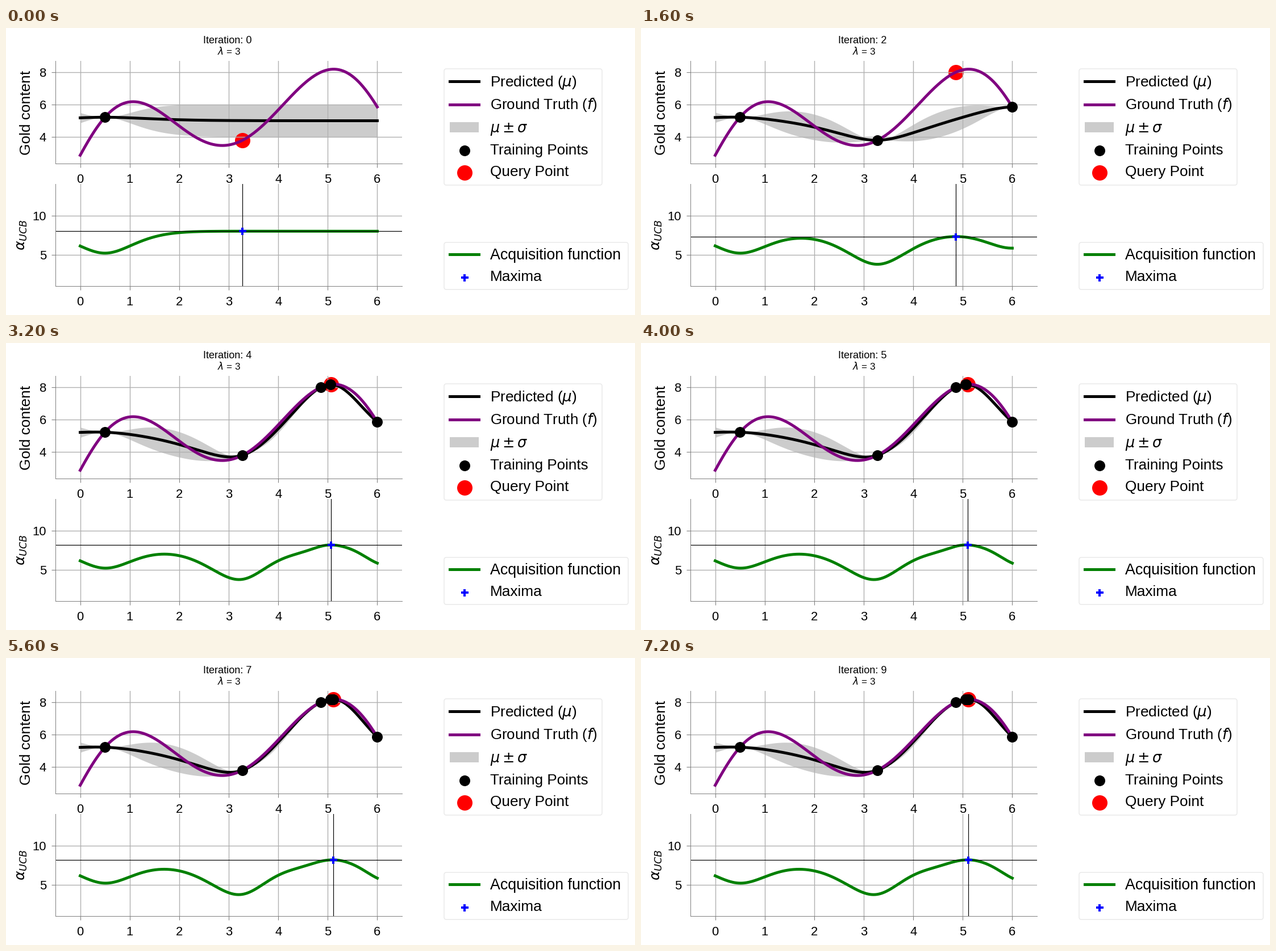
These frames come from a looping animation (1107x506 px, 8 s). A matplotlib script:

```python
import numpy as np
import matplotlib.pyplot as plt
from matplotlib.animation import FuncAnimation
from matplotlib.patches import FancyBboxPatch, Rectangle

W, H, DPI = 1107, 506, 100
PT = 72 / DPI  # points per pixel
FRAMES, STEP_MS = 10, 800
LAM = 3

plt.rcParams["font.family"] = "Liberation Sans"


def basis(x, deg=7):
    return np.vander(np.asarray(x) / 3 - 1, deg + 1, increasing=True)


def fit_truth():
    """Polynomial through a few points, flat at its three turning points."""
    px = [0, 0.5, 1.07, 2, 2.87, 3.28, 4, 4.86, 5.12, 6]
    py = [2.87, 5.245, 6.16, 4.66, 3.48, 3.79, 5.69, 7.99, 8.17, 5.85]
    flat = np.array([1.07, 2.87, 5.12])
    powers = np.arange(1, 8)
    slope = np.zeros((3, 8))
    slope[:, 1:] = powers * (flat[:, None] / 3 - 1) ** (powers - 1)
    rows = np.vstack([basis(px), slope])
    coef = np.linalg.lstsq(rows, np.r_[py, 0, 0, 0], rcond=None)[0]
    return lambda x: basis(x) @ coef


def matern(a, b):
    r = np.sqrt(5) * np.abs(np.subtract.outer(a, b))
    return (1 + r + r**2 / 3) * np.exp(-r)


def posterior(x, xt, yt, mean=5, noise=1e-4):
    k = matern(xt, xt) + noise * np.eye(len(xt))
    ks = matern(x, xt)
    mu = mean + ks @ np.linalg.solve(k, yt - mean)
    var = 1 - np.sum(ks * np.linalg.solve(k, ks.T).T, axis=1)
    return mu, var


truth = fit_truth()
xs = np.linspace(0, 6, 601)
samples = np.array([0.5, 3.28, 6, 4.862, 5.05, 5.07, 5.105, 5.11,
                    5.115, 5.115, 5.115])
values = truth(samples)

# The small margin keeps the pixel size from rounding down
fig = plt.figure(figsize=((W + 0.01) / DPI, (H + 0.01) / DPI), dpi=DPI,
                 facecolor="white")


def panel(top, bottom, ylim, yticks):
    ax = fig.add_axes([87 / W, 1 - bottom / H, 610 / W, (bottom - top) / H])
    ax.set(xlim=(-0.5, 6.5), ylim=ylim, xticks=range(7), yticks=yticks)
    ax.grid(color="#b0b0b0", lw=1.4 * PT)
    ax.spines[["top", "right"]].set_visible(False)
    for side in ("left", "bottom"):
        ax.spines[side].set(color="gray", linewidth=PT)
    ax.tick_params(length=7 * PT, width=1.1 * PT, color="gray",
                   labelsize=22 * PT)
    ax.tick_params(axis="x", pad=10.5 * PT)
    ax.tick_params(axis="y", pad=9 * PT)
    return ax


top = panel(58.5, 239, (2.363, 8.67), (4, 6, 8))
low = panel(275, 455.5, (1, 14), (5, 10))

# Overlay in pixel coordinates for labels and legends
page = fig.add_axes([0, 0, 1, 1], facecolor="none")
page.set(xlim=(0, W), ylim=(H, 0), autoscale_on=False)
page.axis("off")


def label(x, y, text, size=26.3, **kw):
    return page.text(x, y, text, fontsize=size * PT, **kw)


def frame(x0, y0, x1, y1):
    page.add_patch(FancyBboxPatch(
        (x0 + 4, y0 + 4), x1 - x0 - 8, y1 - y0 - 8,
        boxstyle="round,pad=4,rounding_size=4",
        fc="white", ec="#e8e8e8", lw=1.4 * PT))


def dot(ax, x, y, color, size, marker="o", **kw):
    return ax.plot(x, y, marker, color=color, ms=size * PT, mew=0, **kw)[0]


def key_line(y, color):
    page.plot([781, 832], [y, y], color=color, lw=5 * PT)


title = label(389.5, 27, "", 18.2, ha="center")
label(392, 47, r"$\lambda$ = 3", 17, ha="center")
label(36, 149, "Gold content", 26.3, rotation=90, ha="center", va="center")
label(27.5, 365, r"$\alpha_{UCB}$", 25, rotation=90, ha="center", va="center")

frame(771, 72, 1049, 277)
key_line(94.5, "black")
key_line(134.8, "purple")
page.add_patch(Rectangle((781, 166), 51, 18.5, fc="#cccccc", lw=0))
dot(page, 806.5, 216.5, "black", 19)
dot(page, 806.5, 255, "red", 27)
label(852, 103, r"Predicted ($\mu$)")
label(852, 143, r"Ground Truth ($f$)", 26)
label(852, 184, r"$\mu \pm \sigma$", 25.5)
label(852, 222.5, "Training Points", 26)
label(852, 261, "Query Point")

frame(771, 378, 1095, 461)
key_line(399.5, "green")
dot(page, 806.5, 440, "blue", 13, "P")
label(852, 408, "Acquisition function", 26.8)
label(852, 446, "Maxima")

thick = dict(lw=5 * PT, solid_capstyle="projecting")
thin = dict(color="black", lw=1.2 * PT)
mean_line, = top.plot(xs, xs, color="black", **thick)
top.plot(xs, truth(xs), color="purple", **thick)
query = dot(top, [], [], "red", 27, zorder=1.2)
train = dot(top, [], [], "black", 19, zorder=4, clip_on=False)
acq_line, = low.plot(xs, xs, color="green", **thick)
hline = low.axhline(5, **thin)
vline = low.axvline(0, **thin)
peak = dot(low, [], [], "blue", 13, "P", zorder=4)
bands = []


def update(i):
    xt, yt = samples[:i + 1], values[:i + 1]
    xq, yq = samples[i + 1], values[i + 1]
    mu, var = posterior(xs, xt, yt)
    mu_q, var_q = posterior(np.array([xq]), xt, yt)
    best = (mu_q + LAM * var_q)[0]

    while bands:
        bands.pop().remove()
    bands.append(top.fill_between(xs, mu - var, mu + var, color="black",
                                  alpha=0.2, lw=0, zorder=1))
    mean_line.set_ydata(mu)
    train.set_data(xt, yt)
    query.set_data([xq], [yq])
    acq_line.set_ydata(mu + LAM * var)
    hline.set_ydata([best, best])
    vline.set_xdata([xq, xq])
    peak.set_data([xq], [best])
    title.set_text(f"Iteration: {i}")


anim = FuncAnimation(fig, update, frames=FRAMES, init_func=lambda: update(0),
                     interval=STEP_MS, repeat=True, repeat_delay=0, blit=False)
plt.show()
```
